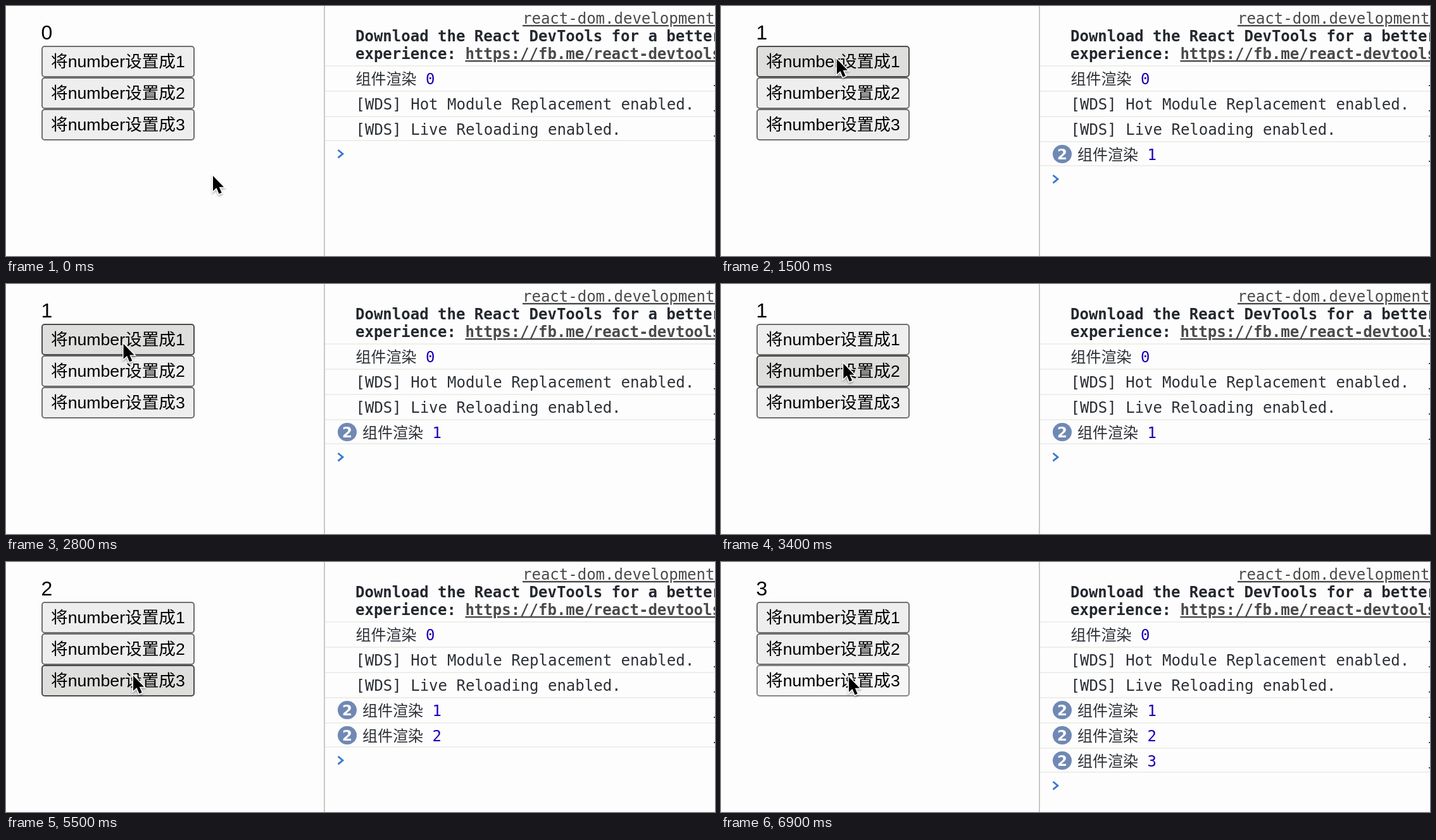
Recreate the animation shown at these times as an HTML page. Size 1120 px wide and 396 px high, loop 7000 ms.

```html
<!DOCTYPE html>
<html lang="zh-CN">
<head>
<meta charset="utf-8">
<style>
  html, body { margin: 0; width: 100%; height: 100%; overflow: hidden; background: #fdfdfd; }
  svg { display: block; width: 1120px; height: 396px; }
  text { white-space: pre; }
  .page { font-family: "Liberation Sans", "Noto Sans CJK SC", "Noto Sans CJK", sans-serif; font-size: 26.667px; }
  .log { font-family: "DejaVu Sans Mono", "Noto Sans CJK SC", "Noto Sans CJK", monospace; font-size: 24px; fill: #2c3036; }
  .bold { font-weight: bold; fill: #24282e; }
  .link { text-decoration: underline; fill: #4a4a4a; }
  .num { fill: #1c00b8; }
  .btn rect { fill: #eeeeee; stroke: #6e6e6e; stroke-width: 2; }
  .btn.hover rect { fill: #dededc; stroke: #4a4a4a; }
  .btn.held rect { fill: #f6f6f6; stroke: #868686; }
  .line { stroke: #eeeeea; stroke-width: 2; }
  .badge { font: bold 23px "DejaVu Sans", sans-serif; fill: #fdfdfd; text-anchor: middle; }
</style>
</head>
<body>
<svg viewBox="0 0 1120 396">
  <defs>
    <filter id="soft" x="-50%" y="-50%" width="200%" height="200%">
      <feDropShadow dx="0" dy="2" stdDeviation="1.5" flood-color="#000" flood-opacity=".35"/>
    </filter>
  </defs>
  <g class="page">
    <text id="count" x="55.5" y="53" font-size="32"></text>
    <g id="buttons"></g>
  </g>
  <path d="M503 0V396" stroke="#c8c8c6" stroke-width="2"/>
  <g class="log">
    <text class="link" x="816" y="28">react-dom.development.js</text>
    <text class="bold" x="552" y="56">Download the React DevTools for a better</text>
    <text class="bold" x="552" y="84">experience: <tspan class="link">https://fb.me/react-devtools</tspan></text>
    <g id="rows"></g>
    <g id="prompt">
      <path class="line" d="M504 213H1120"/>
      <path d="M524.5 228L532 234.2L524.5 240.4" fill="none" stroke="#3878cc" stroke-width="2.8"/>
    </g>
  </g>
  <g id="cursor" filter="url(#soft)">
    <path d="M1 2V26L6.5 21L10.5 30.5L14.7 28.8L10.7 19.8H18Z" stroke="#fdfdfd" stroke-width="3" paint-order="stroke"/>
  </g>
</svg>
<script>
const $ = id => document.getElementById(id);
const LOOP = 7000, STEP = 100;

// Cursor tip: time, x, y
const path = [
  [0, 326, 267], [200, 326, 267], [1000, 182, 82], [2600, 182, 82],
  [3200, 192, 123], [3700, 193, 126], [4700, 193, 126],
  [5300, 199, 176], [5700, 201, 180], [7000, 201, 180]
];
// Spells of repeated clicking, one per button: first and last time
const spells = [[1300, 2500], [3700, 4500], [5700, 6900]];
const CLICK = 400;

const message = n => `组件渲染 <tspan class="num">${n}</tspan>`;

function row(i, text, x = 552.5, extra = "") {
  const y = 95 + 40 * i;
  return `<g><path class="line" d="M504 ${y}H1120"/>${extra}
    <text x="${x}" y="${y + 29}">${text}</text>
    <path d="M1118 ${y + 31}h2" stroke="#4a4a4a" stroke-width="2"/></g>`;
}

function badge(i) {
  const y = 95 + 40 * i;
  return `<rect x="524" y="${y + 5}" width="30" height="29" rx="14.5" fill="#7089b4"/>
    <text class="badge" x="539" y="${y + 28}">2</text>`;
}

$("buttons").innerHTML = [1, 2, 3].map((n, i) => `<g class="btn">
  <rect x="57" y="${64 + 50 * i}" width="240" height="48" rx="4"/>
  <text x="71" y="${97 + 50 * i}">将number设置成${n}</text></g>`).join("");

$("rows").innerHTML = row(0, message(0)) +
  row(1, "[WDS] Hot Module Replacement enabled.") +
  row(2, "[WDS] Live Reloading enabled.") +
  [1, 2, 3].map(n => row(n + 2, message(n), 563, badge(n + 2))).join("");

const buttons = [...$("buttons").children];
const logs = [...$("rows").children].slice(3);

function tip(t) {
  const k = path.findIndex(p => p[0] > t);
  const [t0, x0, y0] = path[k - 1], [t1, x1, y1] = path[k];
  const u = (t - t0) / (t1 - t0), e = u * u * (3 - 2 * u);
  return [x0 + (x1 - x0) * e, y0 + (y1 - y0) * e];
}

function draw(now) {
  const t = Math.floor(now % LOOP / STEP) * STEP;
  const [x, y] = tip(t);
  $("cursor").setAttribute("transform", `translate(${x} ${y})`);

  buttons.forEach((b, i) => {
    const [from, to] = spells[i];
    const held = t >= from && t <= to && (t - from) % CLICK < STEP;
    const over = x > 56 && x < 298 && y >= 63 + 50 * i && y < 113 + 50 * i;
    b.classList.toggle("held", held);
    b.classList.toggle("hover", over && !held);
  });

  // The value changes when the button is first let go
  const count = spells.filter(s => t >= s[0] + STEP).length;
  $("count").textContent = count;
  logs.forEach((g, i) => g.style.display = i < count ? "" : "none");
  $("prompt").setAttribute("transform", `translate(0 ${40 * count})`);
}

function tick() {
  draw(performance.now());
  requestAnimationFrame(tick);
}
tick();
</script>
</body>
</html>
```
